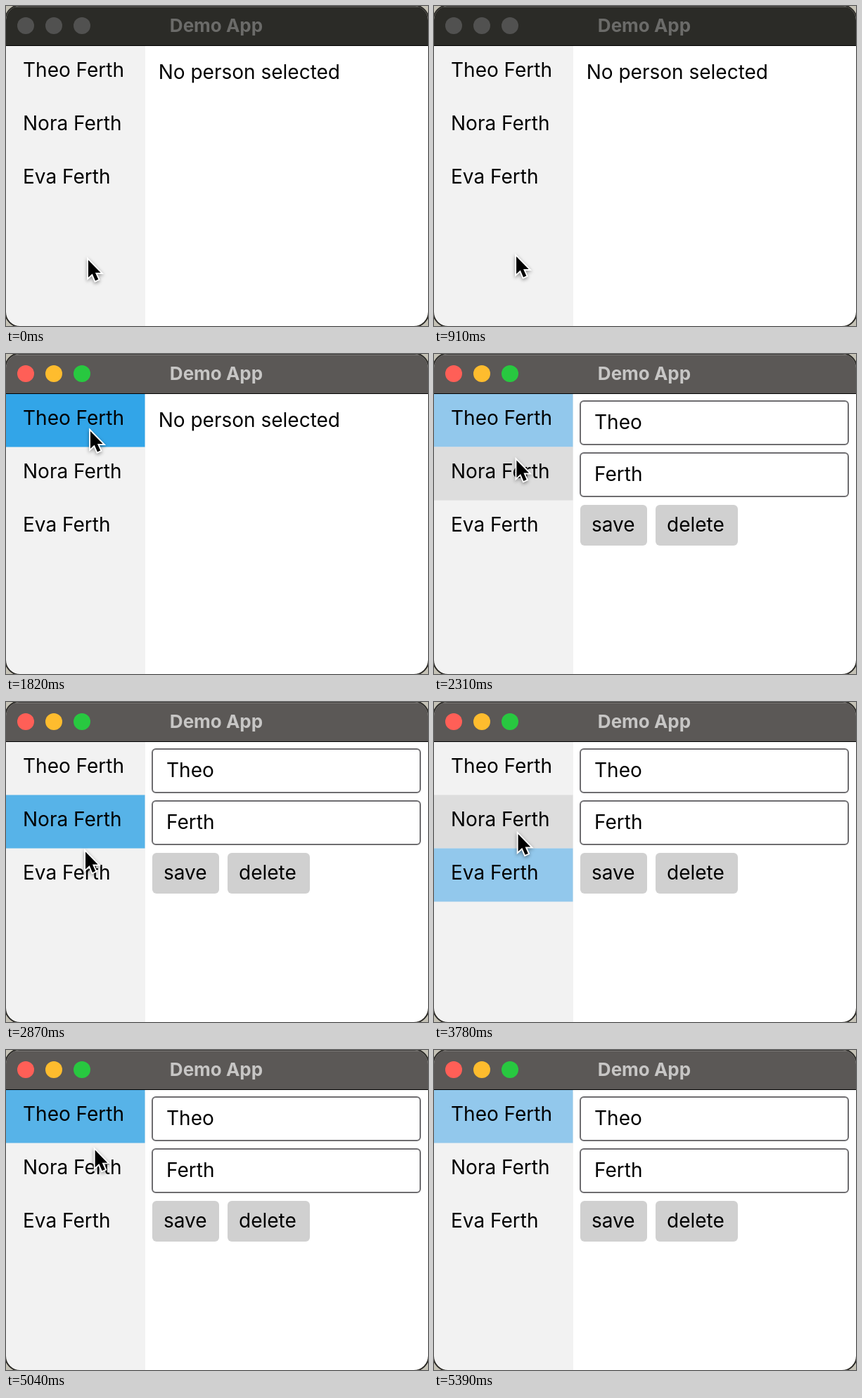
Recreate the animation shown at these times as an HTML page with a canvas. Size 600 by 456 pixels, loop 5670 ms.

```html
<!DOCTYPE html>
<html lang="en">
<head>
<meta charset="utf-8">
<title>Demo App</title>
<style>
  html, body { margin: 0; width: 100%; height: 100%; overflow: hidden; background: #fff; }
  canvas { display: block; width: 600px; height: 456px; }
</style>
</head>
<body>
<canvas id="stage" width="600" height="456"></canvas>
<script>
const ctx = document.getElementById('stage').getContext('2d');
const LOOP = 5670, STEP = 70;
const SIDEBAR = 197.5, ROW_TOP = 56.5, ROW_HEIGHT = 76;
const people = ['Theo Ferth', 'Nora Ferth', 'Eva Ferth'];
const [firstName, lastName] = people[0].split(' ');

const color = {
  sidebar: '#f2f2f2', hover: '#dddddd', selected: '#92c8ec',
  selectedHover: '#57b3e8', pressed: '#32a5e8',
  button: '#d0d0d0', border: '#6e6d70'
};

// The pointer rests at each stop and clicks there just before it leaves.
const stops = [
  { arrive: 0, leave: 840, x: 117, y: 362 },
  { arrive: 1680, leave: 1890, x: 120, y: 110, click: true },
  { arrive: 2590, leave: 2660, x: 116, y: 174, click: true },
  { arrive: 3080, leave: 3290, x: 110, y: 253, click: true },
  { arrive: 3920, leave: 3990, x: 121, y: 179, click: true },
  { arrive: 4410, leave: 4830, x: 127, y: 114, click: true },
  { arrive: 4970, leave: 4970, x: 127, y: 114 },
  { arrive: 5390, leave: LOOP, x: 122, y: 500 }
];

const rowAt = y => Math.floor((y - ROW_TOP) / ROW_HEIGHT);
const clicks = stops.filter(s => s.click)
  .map(s => ({ press: s.leave - STEP, release: s.leave, row: rowAt(s.y) }));
const { press: ACTIVATED, release: FORM_SHOWN } = clicks[0];

const smooth = k => k * k * (3 - 2 * k);

function pointerAt(t) {
  const i = stops.findIndex(s => t <= s.leave);
  const to = stops[i];
  if (t >= to.arrive) return to;
  const from = stops[i - 1];
  const k = smooth((t - from.leave) / (to.arrive - from.leave));
  return { x: from.x + (to.x - from.x) * k, y: from.y + (to.y - from.y) * k };
}

function roundRect(x, y, w, h, r) {
  ctx.beginPath();
  ctx.roundRect(x, y, w, h, r);
}

function rect(x, y, w, h, fill) {
  ctx.fillStyle = fill;
  ctx.fillRect(x, y, w, h);
}

// Text is set at half size on a doubled scale, as on a retina display.
function label(text, x, y, { size = 14, weight = 400, fill = '#000', align = 'left' } = {}) {
  ctx.save();
  ctx.scale(2, 2);
  ctx.font = `${weight} ${size}px Inter, sans-serif`;
  ctx.textAlign = align;
  ctx.fillStyle = fill;
  ctx.fillText(text, x / 2, y / 2);
  ctx.restore();
}

function drawTitleBar(active) {
  rect(0, 0, 600, 57, active ? '#5b5856' : '#2b2b27');
  rect(0, 0, 600, 1, '#3c3b38');
  rect(0, 1, 600, 1, active ? '#7b7876' : '#555450');
  rect(0, 56, 600, 1, '#000');
  ['#ff5f57', '#febc2e', '#28c840'].forEach((light, i) => {
    ctx.fillStyle = active ? light : '#515150';
    ctx.beginPath();
    ctx.arc(28 + i * 40, 28, 12, 0, Math.PI * 2);
    ctx.fill();
  });
  label('Demo App', 299, 36.7, {
    size: 13, weight: 700, fill: active ? '#c7c6c5' : '#6b6b69', align: 'center'
  });
}

function drawSidebar(t, active) {
  rect(0, ROW_TOP, 198, 400, color.sidebar);
  // Hover trails the pointer by one step.
  const hovered = active ? rowAt(pointerAt(t - STEP).y) : -1;
  const pressed = clicks.find(c => t >= c.press && t < c.release);
  const selected = clicks.filter(c => t >= c.release).pop();
  people.forEach((name, row) => {
    const y = ROW_TOP + row * ROW_HEIGHT;
    const isHovered = row === hovered;
    let fill = isHovered ? color.hover : null;
    if (selected?.row === row) fill = isHovered ? color.selectedHover : color.selected;
    if (pressed?.row === row) fill = color.pressed;
    if (fill) rect(0, y, SIDEBAR, ROW_HEIGHT, fill);
    label(name, 24, y + 44.5);
  });
}

function drawField(text, y) {
  roundRect(208, y, 381, 62, 5);
  ctx.strokeStyle = color.border;
  ctx.lineWidth = 2;
  ctx.stroke();
  label(text, 228, y + 40);
}

function drawButton(text, x, width) {
  roundRect(x, 215, width, 58, 6);
  ctx.fillStyle = color.button;
  ctx.fill();
  label(text, x + 16, 253);
}

function drawForm() {
  drawField(firstName, 67);
  drawField(lastName, 141);
  drawButton('save', 208, 95);
  drawButton('delete', 315, 117);
}

function drawPointer({ x, y }) {
  ctx.save();
  ctx.translate(x, y);
  ctx.scale(0.95, 0.95);
  const arrow = new Path2D('M0 0V26L6 20.5L10.5 31L15 29L10.5 19H18.5Z');
  ctx.shadowColor = 'rgba(0,0,0,.4)';
  ctx.shadowBlur = 5;
  ctx.shadowOffsetY = 2;
  ctx.strokeStyle = '#fff';
  ctx.lineWidth = 4;
  ctx.stroke(arrow);
  ctx.shadowColor = 'transparent';
  ctx.fillStyle = '#000';
  ctx.fill(arrow);
  ctx.restore();
}

function draw(t) {
  const active = t >= ACTIVATED;
  rect(0, 0, 600, 456, '#c5c2b6');
  ctx.save();
  roundRect(0, 0, 600, 456, 20);
  ctx.clip();
  rect(0, 0, 600, 456, '#fff');
  drawSidebar(t, active);
  drawTitleBar(active);
  if (t >= FORM_SHOWN) drawForm();
  else label('No person selected', 216.7, 103.5);
  ctx.restore();
  // Sits outside the straight edges, so it only shows at the corners.
  roundRect(-1, -1, 602, 458, 21);
  ctx.strokeStyle = '#2a2926';
  ctx.lineWidth = 2;
  ctx.stroke();
  drawPointer(pointerAt(t));
}

const start = performance.now();
function tick() {
  const t = (performance.now() - start) % LOOP;
  draw(Math.floor(t / STEP) * STEP);
  requestAnimationFrame(tick);
}
tick();
</script>
</body>
</html>
```
